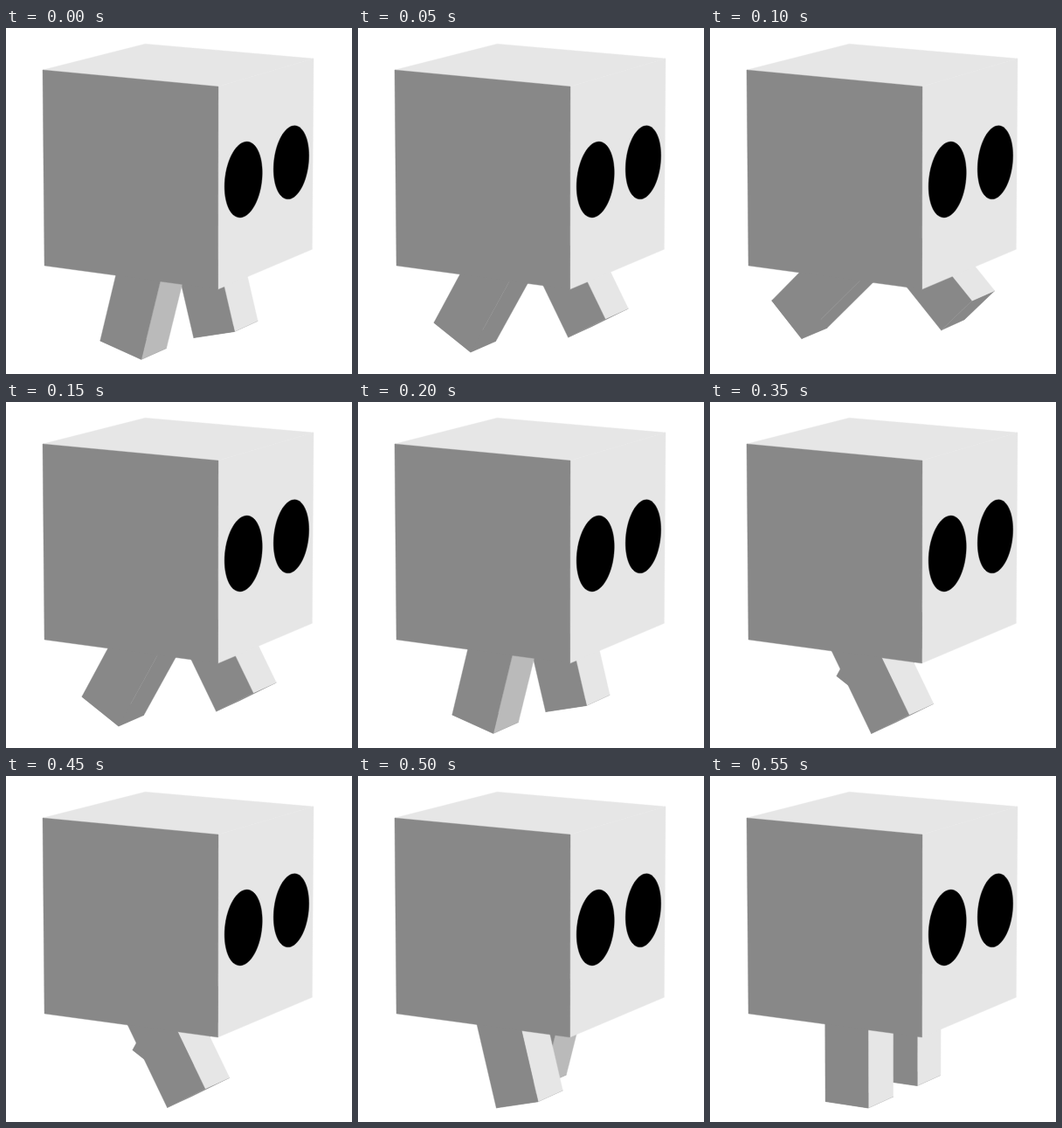
An HTML page with a canvas that plays this animation: 396x396 px, repeating every 600 ms.

```html
<!DOCTYPE html>
<html>
<head>
<meta charset="utf-8">
<style>
  html, body { margin: 0; width: 100%; height: 100%; overflow: hidden; background: #fff; }
  canvas { display: block; }
</style>
</head>
<body>
<canvas id="stage" width="396" height="396"></canvas>
<script>
const ctx = document.getElementById('stage').getContext('2d');
const LIGHT = '#e6e6e6', HALF = '#bababa', DARK = '#888888';
const STEP_MS = 50, STEPS = 12;
const HIP = { forward: 0.5, down: 0.935 };
const LEG = { half: 0.125, top: -0.1, bottom: 0.5 };

// Perspective view of a unit cube; axes run forward, down and sideways.
function project([f, d, s]) {
  const w = 1 - 0.036 * f + 0.012 * d + 0.063 * s;
  return [
    (42 + 192.25 * f + 2.53 * d + 127.25 * s) / w,
    (48 + 16.59 * f + 227.3 * d - 28.64 * s) / w
  ];
}

function face(color, points) {
  ctx.beginPath();
  for (const p of points) ctx.lineTo(...project(p));
  ctx.closePath();
  ctx.fillStyle = ctx.strokeStyle = color;
  ctx.lineWidth = 0.4;
  ctx.fill();
  ctx.stroke();
}

function drawLeg(side, degrees) {
  const a = degrees * Math.PI / 180;
  const sin = Math.sin(a), cos = Math.cos(a);
  const corner = (x, y, s) => [
    HIP.forward + x * cos + y * sin,
    HIP.down + y * cos - x * sin,
    s
  ];
  const { half, top, bottom } = LEG;
  const inner = side + 2 * half;
  const frontColor = degrees >= 0 ? LIGHT : degrees > -20 ? HALF : DARK;

  face(DARK, [corner(-half, bottom, side), corner(half, bottom, side),
              corner(half, bottom, inner), corner(-half, bottom, inner)]);
  face(frontColor, [corner(half, top, side), corner(half, bottom, side),
                    corner(half, bottom, inner), corner(half, top, inner)]);
  face(DARK, [corner(-half, top, side), corner(half, top, side),
              corner(half, bottom, side), corner(-half, bottom, side)]);
}

function drawEye(side) {
  const points = Array.from({ length: 72 }, (_, i) => {
    const a = i * Math.PI / 36;
    return [1, 0.501 + 0.187 * Math.sin(a), side + 0.193 * Math.cos(a)];
  });
  face('#000', points);
}

function drawBody() {
  face(LIGHT, [[0, 0, 0], [0, 0, 1], [1, 0, 1], [1, 0, 0]]);
  face(LIGHT, [[1, 0, 0], [1, 0, 1], [1, 1, 1], [1, 1, 0]]);
  face(DARK, [[0, 0, 0], [1, 0, 0], [1, 1, 0], [0, 1, 0]]);
  drawEye(0.257);
  drawEye(0.763);
}

function frame() {
  const step = Math.floor(performance.now() / STEP_MS) % STEPS;
  const swing = 15 * (Math.abs((step + 4) % STEPS - 6) - 3);
  ctx.fillStyle = '#fff';
  ctx.fillRect(0, 0, 396, 396);
  drawLeg(0.625, -swing);
  drawLeg(0.125, swing);
  drawBody();
  requestAnimationFrame(frame);
}
frame();
</script>
</body>
</html>
```
